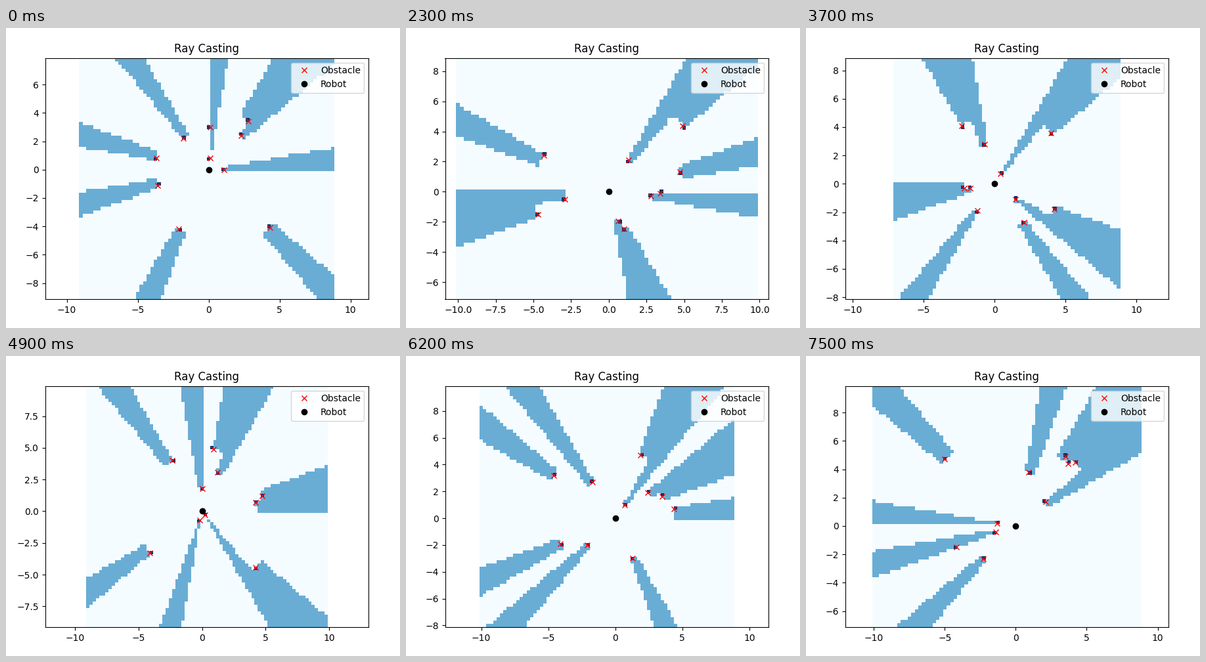
These frames come from a looping animation (600 by 457 pixels, 8 s). A matplotlib script:

```python
import numpy as np
import matplotlib.pyplot as plt
from matplotlib.animation import FuncAnimation
from matplotlib.colors import ListedColormap

W, H, DPI = 600, 457, 100
LEFT, RIGHT, TOP, BOTTOM = 59.5, 552.4, 45.6, 412.9
MARGIN = 5.0               # free area around the obstacles
CELL = 0.25
SECTOR = np.deg2rad(10.0)
STEP_MS, LOOP_MS = 100, 8000
FREE, HIDDEN, OCCUPIED = range(3)
COLORS = ListedColormap(["#f5fcff", "#69add5", "#08306b"])

# Start time in ms -> obstacles as x + yj; everything else is computed.
SCENES = {
    0: [2.8+3.4j, 2.3+2.4j, .1+3j, .1+.8j, -1.8+2.2j,
        -3.7+.8j, -3.6-1.1j, -2.1-4.2j, 4.3-4.1j, 1.1],
    1000: [-1.7+2.7j, -.9+2.8j, 4.1+4.6j, 3.6+.8j, 3+.8j,
           -1.5, -4.3-1.4j, -2.7-3.7j, -.1-2.9j, 1.2-2j],
    2300: [-4.3+2.4j, -2.9-.5j, -4.7-1.5j, 1.3+2.1j, 4.9+4.35j,
           4.7+1.3j, 3.4-.1j, 2.8-.3j, .63-1.95j, 1-2.48j],
    3700: [-2.3+4.1j, -.7+2.8j, .43+.72j, 4+3.6j, -2.14-.3j,
           -1.7-.3j, -1.2-1.9j, 2.1-2.7j, 1.5-1.1j, 4.2-1.8j],
    4900: [-2.35+4j, 1.8j, .87+4.9j, 1.2+3.1j, 4.7+1.2j,
           4.2+.7j, .2-.3j, -.2-.7j, 4.2-4.4j, -4.1-3.3j],
    6200: [-4.6+3.2j, -1.7+2.7j, 1.9+4.7j, .7+1j, 2.4+1.9j,
           3.5+1.63j, 4.4+.7j, 1.3-3j, -4.1-1.9j, -2.1-2j],
    7500: [-5+4.7j, .9+3.8j, 3.68+4.4j, 3.5+4.9j, 4.2+4.5j,
           2.1+1.7j, -1.3+.2j, -1.4-.4j, -4.2-1.5j, -2.3-2.3j],
}


def sector(z):
    """Index of the angular sector that holds a point."""
    return np.floor(np.angle(z) % (2 * np.pi) / SECTOR + 1e-9)


def axis_cells(values):
    """Cell centres along one axis, with room around the obstacles."""
    return np.arange(np.round(values.min() - MARGIN),
                     np.round(values.max() + MARGIN), CELL)


def cell_edges(centres):
    return np.append(centres, centres[-1] + CELL) - CELL / 2


def cast_rays(points):
    """Return the cell edges and the map; later points overwrite earlier."""
    xs, ys = axis_cells(points.real), axis_cells(points.imag)
    cells = xs + 1j * ys[:, None]
    sectors, dist = sector(cells), np.abs(cells)

    grid = np.full(cells.shape, FREE)
    for p in points:
        grid[(sectors == sector(p)) & (dist > abs(p))] = HIDDEN
        row, col = round((p.imag - ys[0]) / CELL), round((p.real - xs[0]) / CELL)
        grid[row, col] = OCCUPIED
    return cell_edges(xs), cell_edges(ys), grid


def build_scene(fig, start, obstacles):
    points = np.array(obstacles)
    box = [LEFT / W, 1 - BOTTOM / H, (RIGHT - LEFT) / W, (BOTTOM - TOP) / H]
    ax = fig.add_axes(box, label=f"scene {start}")
    ex, ey, grid = cast_rays(points)
    ax.pcolormesh(ex, ey, grid, cmap=COLORS, vmin=FREE, vmax=OCCUPIED)
    ax.plot(points.real, points.imag, "xr", label="Obstacle")
    ax.plot(0, 0, "ok", label="Robot")

    # Equal scale: the height fits the map, the width is centred on it.
    half = (ey[-1] - ey[0]) * (RIGHT - LEFT) / (BOTTOM - TOP) / 2
    mid = (ex[0] + ex[-1]) / 2
    ax.set_xlim(mid - half, mid + half)
    ax.set_ylim(ey[0], ey[-1])
    ax.set_title("Ray Casting")
    ax.legend(loc="upper right")
    return ax


fig = plt.figure(figsize=(W / DPI, H / DPI), dpi=DPI, facecolor="white")
scenes = {start: build_scene(fig, start, obs) for start, obs in SCENES.items()}


def update(frame):
    current = max(start for start in scenes if start <= frame * STEP_MS)
    for start, ax in scenes.items():
        ax.set_visible(start == current)
    return list(scenes.values())


anim = FuncAnimation(fig, update, frames=LOOP_MS // STEP_MS, interval=STEP_MS,
                     repeat=True, repeat_delay=0, blit=False)
plt.show()
```
